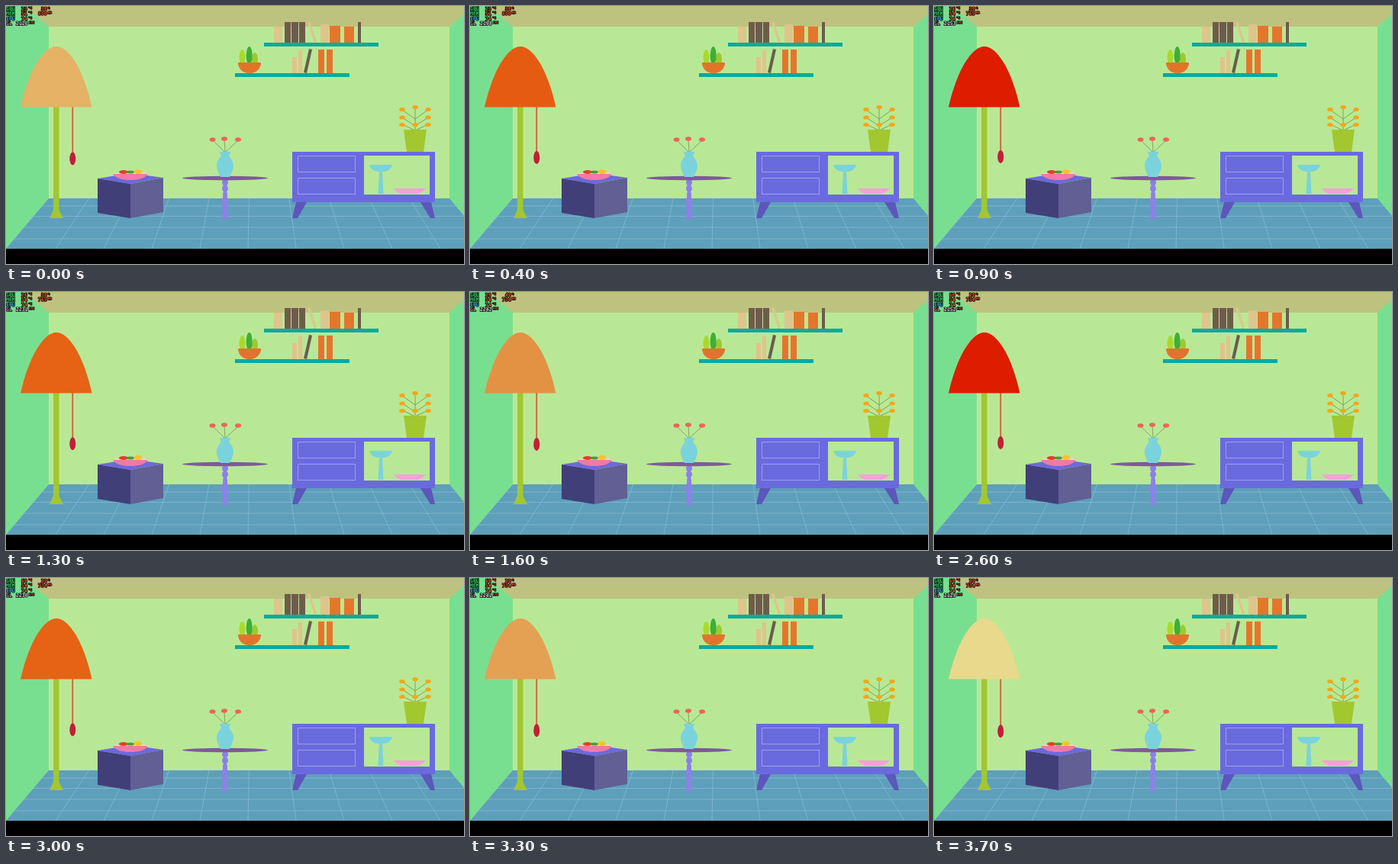
Recreate the animation shown at these times as an HTML page. Size 600 by 338 pixels, loop 3.8 s.

```html
<!DOCTYPE html>
<html lang="en">
<head>
<meta charset="utf-8">
<title>Living room lamp</title>
<style>
  html, body { margin: 0; width: 100%; height: 100%; overflow: hidden; background: #000; }
  svg { display: block; width: 100vw; height: 100vh; }
  .hud text {
    font: bold 6.5px "DejaVu Sans Mono", monospace;
    paint-order: stroke; stroke: #000; stroke-width: 1.4px;
  }
  .hud .unit { font-size: 4px; }
</style>
</head>
<body>
<svg viewBox="0 0 600 338" preserveAspectRatio="none">
  <!-- room -->
  <path fill="#79df90" d="M0 0H600V318H0Z"/>
  <path fill="#bec27f" d="M24 0H600V10L581 27H56Z"/>
  <path fill="#b8e896" d="M56 27H581V252H56Z"/>
  <path fill="#5e9fbb" d="M56 252H581L600 275V318H0Z"/>
  <path id="tiles" fill="none" stroke="#86bace" stroke-width=".8"/>
  <path d="M0 318H600V338H0Z"/>

  <!-- shelves -->
  <path fill="#08aa9c" d="M338 48H488V53H338ZM300 88H450V93H300Z"/>
  <path fill="#dfc48b" d="M351 27H362V48H351ZM395 21L398 20 407 46 404 48ZM412 24H423V48H412ZM375 67H381V88H375ZM383 58H388V88H383Z"/>
  <path fill="#6f5b4d" d="M365 21H373V48H365ZM374 21H383V48H374ZM384 21H392V48H384ZM461 21H465V48H461ZM397 56L401 57 394 88 390 87Z"/>
  <path fill="#e4762c" d="M424 26H438V48H424ZM443 27H456V48H443ZM409 57H417V88H409ZM420 57H428V88H420Z"/>
  <ellipse cx="309.5" cy="67" rx="4" ry="10" fill="#a9d92f"/>
  <ellipse cx="326" cy="70" rx="4" ry="9" fill="#a2c72f"/>
  <ellipse cx="318.7" cy="65" rx="4" ry="12" fill="#3daf35"/>
  <path fill="#e0742a" d="M304 74H334C334 82 328 88 319 88S304 82 304 74Z"/>

  <!-- cube and fruit bowl -->
  <path fill="#6b69dc" d="M120 226L163 219 206 225 163 233Z"/>
  <path fill="#413f78" d="M120 226L163 233V278L120 271Z"/>
  <path fill="#615f94" d="M163 233L206 225V270L163 278Z"/>
  <ellipse cx="163" cy="219.5" rx="23" ry="1.8" fill="#f8d3c9"/>
  <ellipse cx="154" cy="217.5" rx="6" ry="2.5" fill="#e43e2b"/>
  <ellipse cx="163" cy="217.5" rx="5" ry="2" fill="#4d9a3c"/>
  <ellipse cx="173" cy="217" rx="5.5" ry="3" fill="#fdc22a"/>
  <path fill="#f079a6" d="M140 220H186C182 226 174 228 163 228S144 226 140 220Z"/>

  <!-- table, vase, flowers -->
  <g id="leg" fill="#8d80e8"></g>
  <ellipse cx="287" cy="225.5" rx="56" ry="2.8" fill="#7d599f"/>
  <path fill="none" stroke="#7b8f52" stroke-width=".8" d="M287 192L271 176M287 192L286 174M287 192L304 176"/>
  <path fill="#7ad3dc" d="M279.500 191H294.500C292 195 292 197 294 199C300 206 299 213 293 224H281C275 213 274 206 280 199C282 197 282 195 279.500 191Z"/>
  <g id="reds" fill="#f4605a"></g>

  <!-- cabinet -->
  <path fill="#5c57b9" d="M380 257H394L382 278H375ZM543 257H557L562 278H556Z"/>
  <path fill="#6a6adf" d="M375 191H562V257H375Z"/>
  <path fill="none" stroke="#a5a5ee" stroke-width=".9" d="M382.500 196.500H457.500V217.500H382.500ZM382.500 225.500H457.500V246.500H382.500Z"/>
  <path fill="#b8e896" d="M469 196H555V247H469Z"/>
  <path fill="#7ad3dc" d="M476 208H506C505 214 499 217 493 217L494.500 246H487.500L489 217C483 217 477 214 476 208Z"/>
  <path fill="#f6a1d7" d="M508 239H550C546 244 541 246 538 246H520C516 246 511 244 508 239Z"/>
  <path fill="none" stroke="#7a9f3d" stroke-width=".9" d="M536 163V132M536 148L519 136M536 148L553 136M536 157L519 146M536 157L553 146M536 163L519 155M536 163L553 155"/>
  <path fill="#a2c72f" d="M521 162H551L547 191H525Z"/>
  <g id="oranges" fill="#f8a51b"></g>

  <!-- lamp -->
  <path fill="#a2c72f" d="M62 132H69.500V267L75 278H57L62 267Z"/>
  <path id="cord" fill="none" stroke="#d8552f" stroke-width="1.7"/>
  <ellipse id="pull" cx="87.300" rx="4" ry="8.500" fill="#c11f38"/>
  <path id="shade" d="M19 132.500C31 80 51 53 66 53S101 80 112.500 132.500Z"/>

  <g class="hud" id="hud"></g>
</svg>
<script>
const LOOP = 3800, STEP = 100;
const NS = "http://www.w3.org/2000/svg";
const $ = id => document.getElementById(id);

function add(parent, tag, attrs, text = "") {
  const el = document.createElementNS(NS, tag);
  for (const k in attrs) el.setAttribute(k, attrs[k]);
  el.textContent = text;
  parent.append(el);
  return el;
}

const dots = (id, points, rx, ry) =>
  points.forEach(([cx, cy]) => add($(id), "ellipse", { cx, cy, rx, ry }));

dots("reds", [[270.5, 175], [286, 174], [304, 175]], 4, 2.8);
dots("oranges", [[519, 135.5], [536, 132.5], [553, 135.5], [519, 146],
  [553, 146], [519, 155.5], [536, 155.5], [553, 155.5]], 3.8, 2.6);
dots("leg", [[287, 231], [287, 239]], 4, 4.5);
dots("leg", [[287, 247]], 3, 4.5);
dots("leg", [[287, 257]], 4, 10);
dots("leg", [[287, 270]], 3, 8);
dots("leg", [[287, 277]], 5, 2);

// floor tiles, clipped to the side walls
let tiles = "";
for (let k = 1; k < 10; k++) {
  const x = 56 + 52.5 * k;
  tiles += `M${x} 252L${326 + (x - 326) * 1.2} 318`;
}
for (const y of [262, 275.5, 290, 305]) {
  const d = (y - 252) * 0.85;
  tiles += `M${56 - d} ${y}H${Math.min(600, 581 + d)}`;
}
$("tiles").setAttribute("d", tiles);

// piecewise linear lookup; rows are [position, value, ...]
function sample(rows, p) {
  let i = 1;
  while (i < rows.length - 1 && rows[i][0] < p) i++;
  const a = rows[i - 1], b = rows[i];
  const f = Math.max(0, Math.min(1, (p - a[0]) / (b[0] - a[0])));
  return a.slice(1).map((v, n) => v + (b[n + 1] - v) * f);
}

const glow = [[0, .77], [600, .1], [800, 0], [950, 0], [1300, .36], [1600, .6],
  [2000, 1], [2550, 0], [2650, 0], [3000, .36], [3600, 1], [3800, .95]];
const tint = [[0, 222, 28, 0], [.36, 230, 98, 20], [.6, 227, 146, 68],
  [.77, 229, 178, 102], [1, 232, 222, 145]];
const stats = [[0, 23, 30, 51, 800], [600, 26, 30, 54, 765],
  [1400, 29, 40, 54, 734], [2500, 60, 20, 54, 734]];

const label = (x, y, fill, text, cls = "") =>
  add($("hud"), "text", { x, y, fill, class: cls }, text);
label(0, 5.5, "#35d86b", "GPU");
label(0, 12, "#35d86b", "MEM");
label(0, 18.5, "#42b7e5", "CPU");
label(0, 25, "#b5a0a8", "GL");
const hot = "#f05a32";
const temp = label(20, 5.5, hot, "");
const load = label(46, 5.5, hot, "");
const mem = label(20, 12, hot, "");
const clock = label(42, 12, hot, "");
label(20, 18.5, hot, "74");
const fps = label(13, 25, "#ded5dc", "");
[[29, 3.5, "°C"], [29, 10, "°C"], [29, 16.5, "°C"], [55, 3.5, "%"],
  [55, 10, "MB"], [30, 23, "FPS"]].forEach(([x, y, s]) => label(x, y, hot, s, "unit"));

function draw(t) {
  const [g] = sample(glow, t);
  $("shade").setAttribute("fill", `rgb(${sample(tint, g).map(Math.round)})`);
  const y = 197.5 + 3.3 * g;
  $("pull").setAttribute("cy", y);
  $("cord").setAttribute("d", `M87.300 132V${y - 6}`);
  const row = stats.filter(r => r[0] <= t).pop();
  [temp, load, mem, clock].forEach((el, i) => { el.textContent = row[i + 1]; });
  fps.textContent = 2120 + (t / STEP * 67) % 190;
}

function tick(now) {
  draw(Math.floor(now % LOOP / STEP) * STEP);
  requestAnimationFrame(tick);
}
draw(0);
requestAnimationFrame(tick);
</script>
</body>
</html>
```
